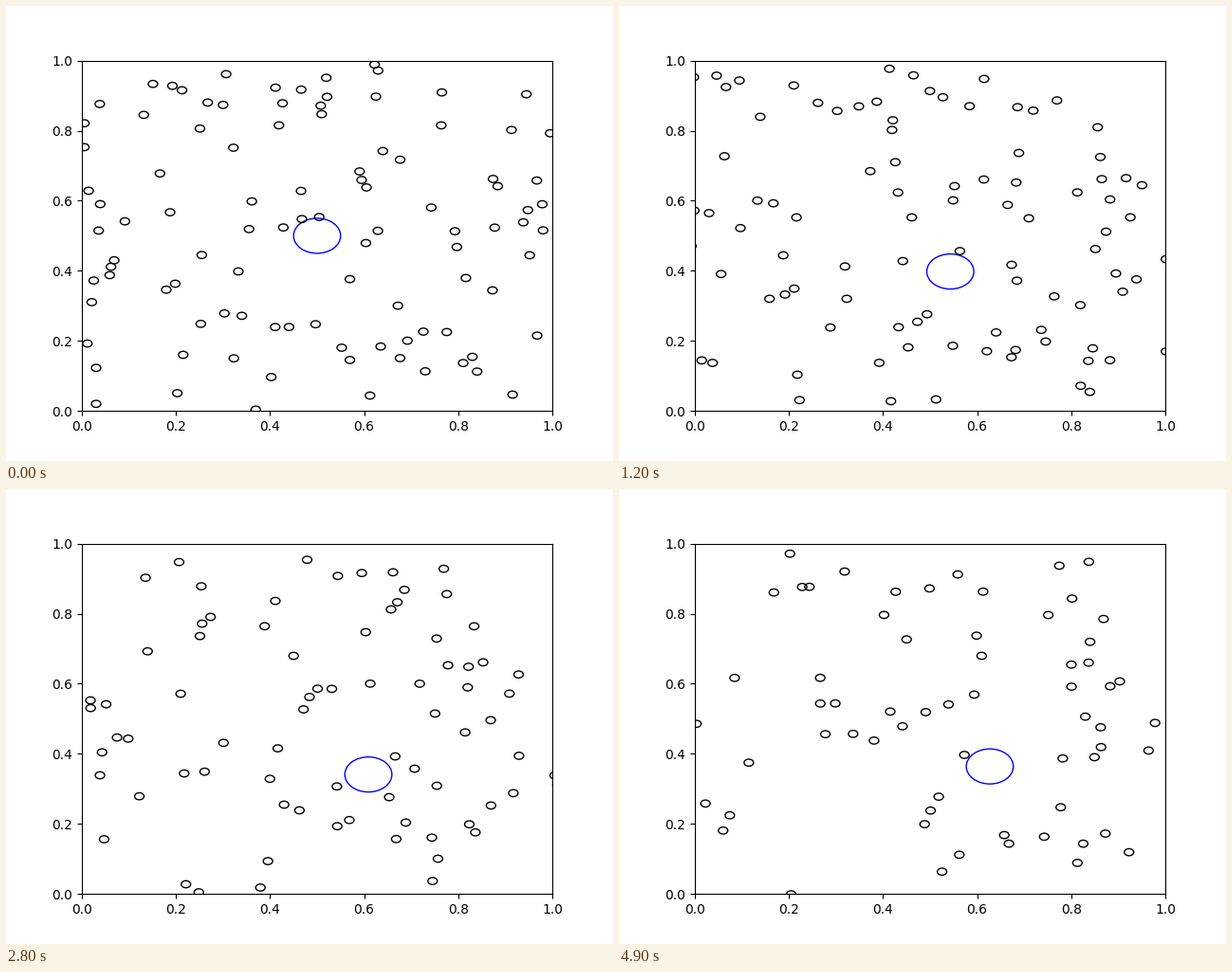
Write a matplotlib script that moves like this. It is 640 px wide and 480 px high and loops after 5 s.

```python
import matplotlib.pyplot as plt
import numpy as np
from matplotlib.animation import FuncAnimation
from matplotlib.patches import Circle

FRAMES, INTERVAL = 50, 100
PARTICLES, RADIUS, BALL_RADIUS = 100, 0.01, 0.05
SPEED = 0.0055

# The heavy ball drifts down and right, slowed and turned by hits from below
steps = np.arange(FRAMES)
knots = [0, 4, 12, 20, 28, 36, 49]
ball_path = np.column_stack([
    np.interp(steps, knots, [0.5, 0.507, 0.543, 0.577, 0.609, 0.622, 0.627]),
    np.interp(steps, knots, [0.5, 0.463, 0.398, 0.358, 0.341, 0.348, 0.364]),
])
ball_velocity = np.gradient(ball_path, axis=0)


def impulse(offset, relative_velocity):
    """Closing velocity along the line of centres, zero when separating."""
    normal = offset / np.linalg.norm(offset)
    return min(relative_velocity @ normal, 0) * normal


def bounce_off_each_other(positions, velocities):
    gaps = np.linalg.norm(positions[:, None] - positions, axis=2)
    for i, j in np.argwhere(np.triu(gaps < 2 * RADIUS, 1)):
        push = impulse(positions[i] - positions[j],
                       velocities[i] - velocities[j])
        velocities[i] -= push
        velocities[j] += push


def bounce_off_ball(positions, velocities, step):
    offsets = positions - ball_path[step]
    touching = np.linalg.norm(offsets, axis=1) < BALL_RADIUS + RADIUS
    for i in np.flatnonzero(touching):
        closing = velocities[i] - ball_velocity[step]
        velocities[i] -= 2 * impulse(offsets[i], closing)


def simulate():
    """Positions of all particles at every step; the box has no walls."""
    rng = np.random.default_rng(7)
    positions = rng.random((PARTICLES, 2))
    velocities = rng.normal(0, SPEED, (PARTICLES, 2))
    history = []
    for step in steps:
        history.append(positions)
        bounce_off_each_other(positions, velocities)
        bounce_off_ball(positions, velocities, step)
        positions = positions + velocities
    return history


history = simulate()

fig, ax = plt.subplots(figsize=(6.4, 4.8), dpi=100)
ax.set(xlim=(0, 1), ylim=(0, 1))
ball = ax.add_patch(Circle(ball_path[0], BALL_RADIUS, fill=False, ec="blue"))
particles = [ax.add_patch(Circle(p, RADIUS, fill=False)) for p in history[0]]


def update(step):
    ball.center = ball_path[step]
    for particle, position in zip(particles, history[step]):
        particle.center = position
    return [ball, *particles]


animation = FuncAnimation(fig, update, frames=FRAMES, interval=INTERVAL,
                          repeat=True, repeat_delay=0)
plt.show()
```
